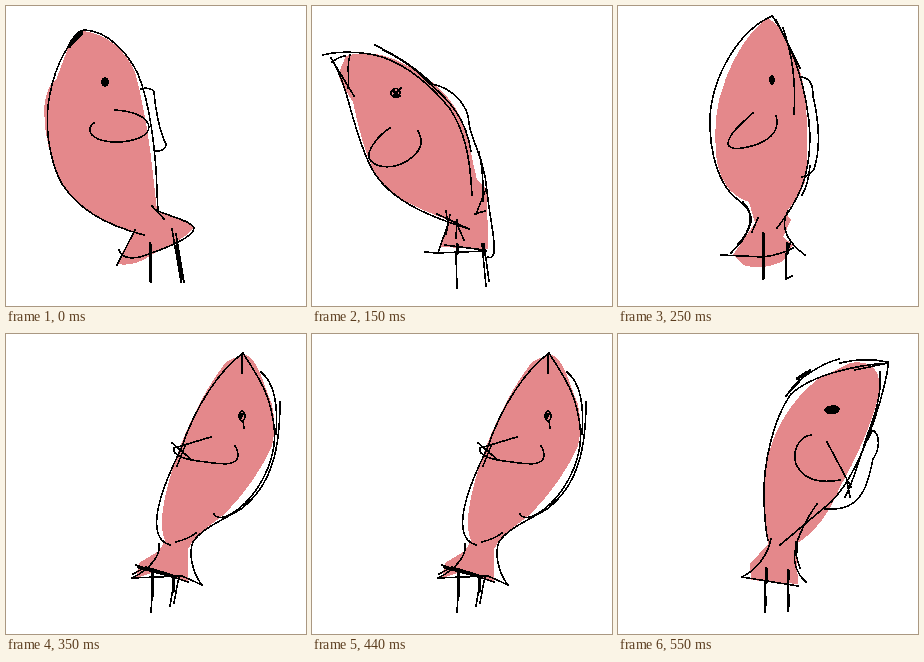
An HTML page for the animation above (0.65 s loop, 300x300 px).

```html
<!DOCTYPE html>
<html lang="en">
<head>
<meta charset="utf-8">
<title>Wobbling fish</title>
<style>
html, body { margin: 0; width: 100%; height: 100%; overflow: hidden; background: #fff; }
svg { display: block; width: 100%; height: 100%; }
path { fill: none; stroke: #000; stroke-width: 1.6; stroke-linecap: round; stroke-linejoin: round; shape-rendering: crispEdges; }
.skin { fill: #e4888b; stroke: none; }
.bold { stroke-width: 3; }
.dot { fill: #000; }
g { visibility: hidden; }
g.on { visibility: visible; }
</style>
</head>
<body>
<svg viewBox="0 0 300 300">
  <g id="left">
    <path class="skin" d="M62 42L77 25C103 28 120 46 129 66C136 92 143 130 146 160L151 204C165 210 183 213 188 221C181 232 160 241 145 249C134 257 124 260 111 258L116 247L128 226C98 217 71 202 56 177C44 155 38 128 38 102C40 86 44 76 50 74Z"/>
    <path d="M62 41C66 32 72 25 78 24C101 24 122 47 132 68C145 100 150 150 151 185L152 206M76 25C58 40 46 68 42 100C39 130 46 160 56 178C72 202 96 218 138 229"/>
    <path d="M109 104C125 105 142 110 143 121C143 130 128 136 110 136C95 136 84 131 84 124Q84 119 88 117M135 83C140 81 147 83 148 86C149 100 153 125 160 138C160 143 154 146 149 145"/>
    <path d="M146 200L158 213M150 204C162 210 186 215 188 222C187 232 160 242 140 249C130 253 116 254 113 244M129 224L111 259M166 223L175 276M170 228L178 276"/>
    <path class="bold" d="M63 41L76 27M144 237L145 276M171 238L176 273"/>
    <path class="dot" d="M96 76a3 4 0 1 0 6 0a3 4 0 1 0-6 0"/>
  </g>
  <g id="farLeft">
    <path class="skin" d="M34 50C50 45 70 46 90 57C115 69 136 86 149 112C158 134 160 155 165 174L175 184L176 243L129 241L136 214C110 204 78 192 63 168C53 148 46 120 41 96C32 82 26 74 27 66Z"/>
    <path d="M11 49C25 45 50 45 70 51C95 59 120 80 138 103C151 123 158 146 160 189M63 39C85 50 105 62 120 78C140 82 156 98 157 117M71 44C92 54 107 66 117 77C137 94 154 112 159 145M157 117C159 135 172 150 175 185C178 215 184 235 182 247Q180 253 176 251"/>
    <path d="M38 49C34 62 38 70 36 82M19 52L42 90M20 56Q28 50 33 50M21 55C30 72 33 82 36 94C42 116 48 138 57 157C72 192 115 210 157 223M167 146Q172 168 171 195"/>
    <path d="M78 122C65 130 55 145 57 152C62 162 80 164 95 155C108 146 113 138 106 125M79 87a4.5 4.5 0 1 0 9 0a4.5 4.5 0 1 0-9 0M80 85L88 90L81 90L89 82M82 84L86 91"/>
    <path d="M113 246L125 247L174 245M133 239L172 244M125 208L157 223M134 205L136 218L126 247M138 209L134 228M145 214L144 232M144 216L152 234M164 208L174 183M163 208L173 205M170 238L174 280M172 238L177 275"/>
    <path class="bold" d="M145 238V248M171 238L172 249"/>
    <path d="M144 248L145 282"/>
  </g>
  <g id="upright">
    <path class="skin" d="M150 12C165 20 178 50 184 72C190 100 191 150 187 176C181 192 172 200 168 207L173 214L165 231L175 239L165 255Q145 265 125 259L115 249L137 217L131 196C110 190 100 170 98 148C96 125 97 98 108 72C118 47 132 24 150 12Z"/>
    <path d="M154 10C120 25 95 70 92 110C91 150 102 180 119 193C137 206 137 216 124 235L113 247M125 196Q142 214 120 238M155 11C175 40 190 85 192 130C192 172 180 195 159 222M165 22C175 50 178 80 176 108M158 14L182 62"/>
    <path d="M183 71C192 72 195 78 195 90C202 120 202 145 196 163Q192 170 184 171M192 160Q190 180 184 189M135 107C120 120 110 130 110 138C112 145 125 143 140 138C155 132 162 122 158 110"/>
    <path d="M103 249L145 251C160 249 168 246 175 242M170 205C160 222 172 238 187 249M140 212L134 226M173 236L168 248V273L174 270"/>
    <path class="bold" d="M145 227V273M169 237V248"/>
    <path class="dot" d="M152 74a2 4 0 1 0 4 0a2 4 0 1 0-4 0"/>
  </g>
  <g id="right">
    <path class="skin" d="M237 20C248 21 254 38 260 55C270 75 270 95 266 112C258 130 240 160 215 183C200 194 187 203 182 215L182 247L148 238L130 244L133 229L153 217L159 207C152 190 158 165 165 140C175 105 195 60 220 28Z"/>
    <path d="M237 19C215 35 190 70 175 115C160 145 148 175 151 195Q153 208 164 211M237 19C250 40 262 55 267 85C275 125 250 165 225 180Q212 187 208 180M255 38C270 50 272 75 270 100M274 68C274 110 268 150 235 175C215 187 195 195 187 208C182 220 187 240 196 251M236 20V39"/>
    <path d="M205 103L168 114C166 122 180 126 200 128C220 131 231 131 232 122Q232 116 229 112M166 109L186 126M179 112L171 132M170 208Q182 205 190 199M237 87L238 94"/>
    <path d="M153 210C155 220 145 235 126 244L176 242L196 251M130 231L182 248M127 240L140 233L173 243M169 242L164 272M172 247L168 269"/>
    <path class="bold" d="M146 235V263M132 233L169 243M167 244V258"/>
    <path d="M146 263L145 278M233 82a3 5 0 1 0 6 0a3 5 0 1 0-6 0M235 80V84L237 80"/>
  </g>
  <g id="lean">
    <path class="skin" d="M232 29C255 25 264 38 261 60C254 90 237 127 222 153C212 178 197 199 178 210L180 250L133 246L132 230L150 210C146 190 144 160 148 130C155 97 172 67 200 45Z"/>
    <path d="M270 29C240 31 195 40 173 60C155 85 145 130 146 165Q147 195 150 206M168 62L192 36M171 58C180 44 205 29 221 25M222 29Q245 23 270 28M237 36L270 29C270 42 265 55 262 68C250 108 233 148 213 168L162 211M262 38C264 65 255 85 248 105C242 125 236 146 227 163"/>
    <path d="M153 205C150 220 140 235 124 243L180 252M199 170C190 182 178 205 177 218L182 234M180 205C172 228 179 240 188 248M147 248V278M170 246V277"/>
    <path class="bold" d="M148 234V249M170 236V246M179 45L189 38M178 208V219M147 262V272M170 260V273"/>
    <path class="dot" d="M207 76C209 71 220 71 221 75C220 80 209 82 207 76Z"/>
  </g>
  <g id="finOut">
    <path d="M205 103C190 107 172 111 167 115C163 122 175 124 188 128M168 119C180 126 205 127 224 130C231 131 235 120 231 114L227 111M270 108C270 145 250 178 225 180"/>
  </g>
  <g id="finIn">
    <path d="M193 101C180 103 174 118 178 130C185 145 200 150 222 146M209 108L233 153M256 97C262 102 262 115 255 125C250 150 245 165 230 172Q220 176 207 175M250 105L254 97M229 148L232 163"/>
  </g>
</svg>
<script>
// Each pose lasts until its end time (ms) and shows the listed groups.
const poses = [
  [150, "left"], [250, "farLeft"], [350, "upright"],
  [500, "right"], [550, "lean", "finOut"], [650, "lean", "finIn"]
];
const groups = document.querySelectorAll("g");
const start = performance.now();

function draw() {
  const t = (performance.now() - start) % 650;
  const pose = poses.find(([end]) => t < end);
  groups.forEach(g => g.classList.toggle("on", pose.includes(g.id)));
  requestAnimationFrame(draw);
}
draw();
</script>
</body>
</html>
```
